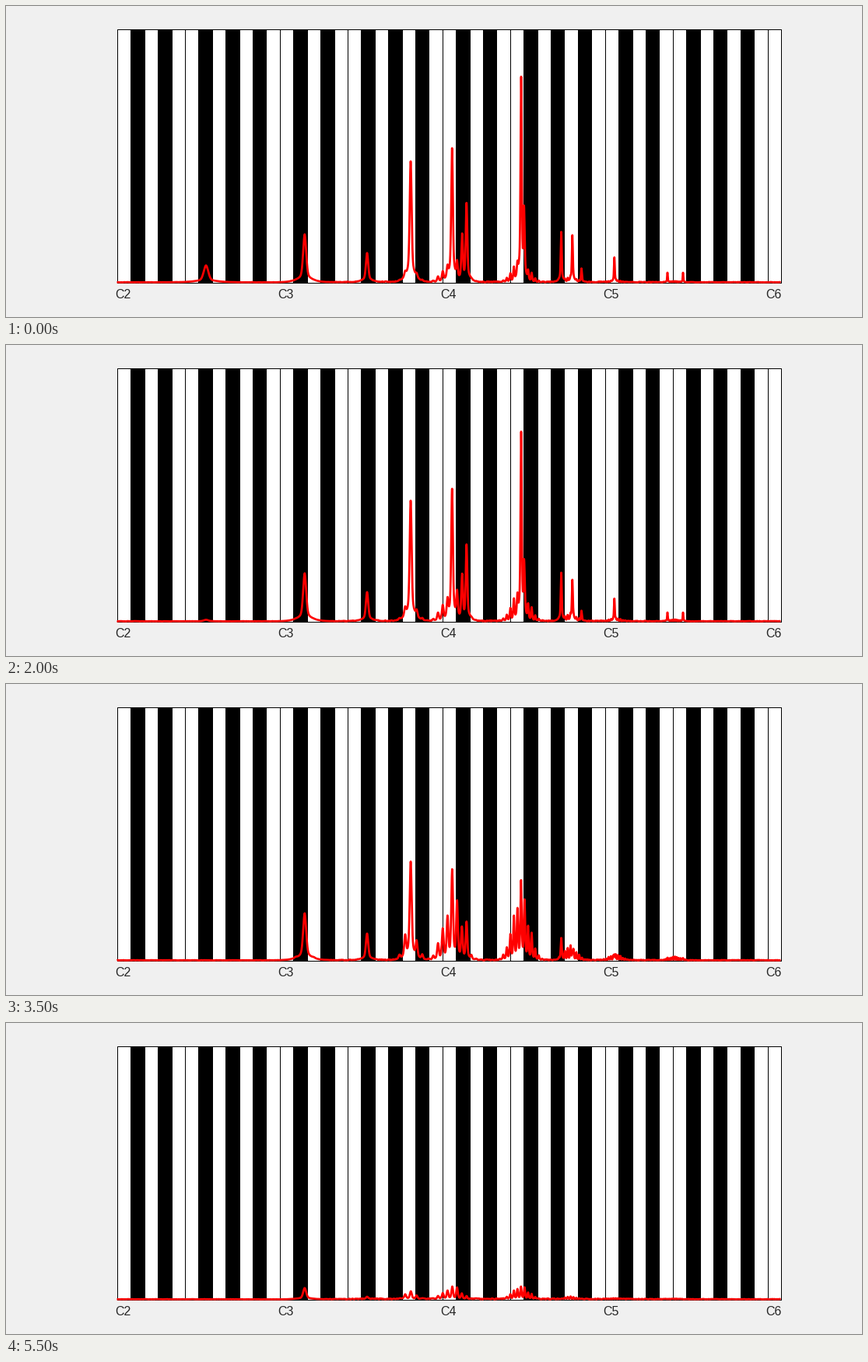
A matplotlib script that plays this animation: 1100 px wide and 400 px high, repeating every 6 s.

```python
import matplotlib.pyplot as plt
import numpy as np
from matplotlib.animation import FuncAnimation
from matplotlib.patches import Rectangle

W, H, DPI = 1100, 400, 100
FRAMES, STEP_MS = 12, 500
LEFT, RIGHT, TOP, BOTTOM = 143, 996, 30, 356
KEYS, OCTAVE = 49, 209
BLACK = {1, 3, 6, 8, 10}

# Ringing partials: x, height, step at which half the height is gone
PARTIALS = (
    (257.5, 24, 2), (384.3, 62, 10), (464.5, 38, 9), (520.5, 156, 8),
    (573.7, 172, 7), (586.7, 62, 6.5), (592.3, 103, 6.8), (662.5, 267, 6),
    (666.2, 95, 5), (714, 65, 6.8), (728.3, 62, 5.7), (740, 18, 5),
    (782.3, 33, 6), (850.5, 13, 6), (870.5, 13, 6),
)
# Beating clusters: centre, height, spread in lobes
CLUSTERS = (
    (384.3, 10, 1), (520.8, 60, 1.4), (574, 92, 2.6), (662.3, 90, 3.2),
    (726, 22, 3), (784, 8, 4), (860, 5, 5),
)

X = np.arange(LEFT, RIGHT + 0.1, 0.2)


def px(n):
    """Pixels to points."""
    return n * 72 / DPI


def width(x):
    # On a log axis a fixed bandwidth narrows towards the treble
    return 1.7 * 2 ** ((520 - x) / OCTAVE)


def peak(x, height):
    d = np.abs(X - x) / width(x)
    return height * (0.75 * np.exp(-d ** 2) + 0.25 * np.exp(-d / 3))


def lobes():
    rng = np.random.default_rng(3)
    for centre, height, spread in CLUSTERS:
        for j in range(-6, 7):
            size = height * np.exp(-(j / spread) ** 2) * rng.uniform(0.7, 1)
            yield peak(centre + 4.3 * width(centre) * j, size)


LOBES = sum(lobe ** 2 for lobe in lobes())


def noise(step):
    rng = np.random.default_rng(step + 5)
    grid = np.arange(LEFT, RIGHT + 1)
    level = np.interp(grid, (400, 470, 700, 900), (0.3, 1.0, 1.0, 0.4))
    return np.interp(X, grid, level * rng.uniform(0, 1.4, grid.size))


def spectrum(step):
    beat = np.interp(step, (0, 3, 7, 11), (0.35, 0.35, 1, 0.2))
    power = beat ** 2 * LOBES + noise(step) ** 2
    for x, height, fade in PARTIALS:
        power += peak(x, height / (1 + np.exp((step - fade) / 0.85))) ** 2
    return np.sqrt(power)


fig = plt.figure(figsize=(W / DPI, H / DPI), dpi=DPI, facecolor="#f0f0f0")
ax = fig.add_axes((0, 0, 1, 1))
ax.set(xlim=(0.5, W + 0.5), ylim=(H + 0.5, 0.5))
ax.axis("off")


def bar(x0, x1, color):
    ax.add_patch(Rectangle((x0, TOP), x1 - x0, BOTTOM - TOP,
                           fc=color, ec="black", lw=px(1)))


# Keyboard
bar(LEFT, RIGHT, "white")
edges = np.round(np.linspace(LEFT, RIGHT, KEYS + 1))
for k in range(1, KEYS):
    if k % 12 in BLACK:
        bar(edges[k], edges[k + 1], "black")
    elif k % 12 in (0, 5):
        ax.plot([edges[k]] * 2, [TOP, BOTTOM], color="black", lw=px(1))

for n in range(5):
    ax.text(151 + OCTAVE * n, 377, f"C{n + 2}", ha="center", va="baseline",
            family="Liberation Sans", size=px(16), color="#262626")

line, = ax.plot([], [], color="red", lw=px(2.7), solid_joinstyle="round",
                solid_capstyle="butt", zorder=5)


def draw(step):
    line.set_data(X, BOTTOM - spectrum(step))
    return line,


anim = FuncAnimation(fig, draw, frames=FRAMES, interval=STEP_MS,
                     repeat=True, repeat_delay=0, blit=False)
plt.show()
```
